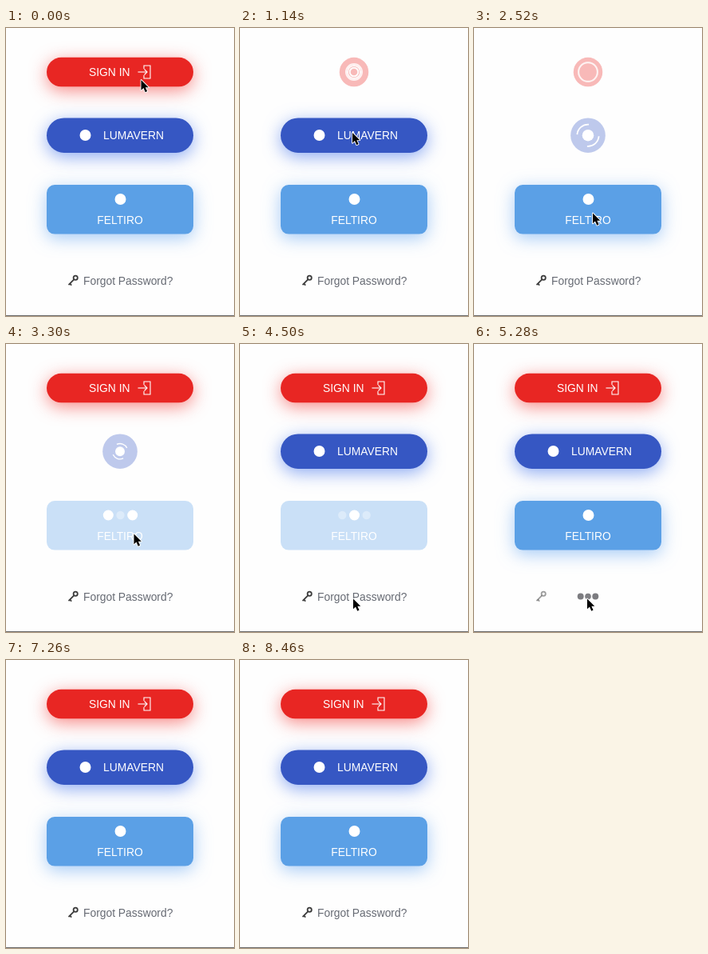
An HTML page with a canvas for the animation above (8520 ms loop, 286x360 px).

```html
<!DOCTYPE html>
<html lang="en">
<head>
<meta charset="utf-8">
<title>Loading buttons</title>
<style>
html, body { margin: 0; width: 100%; height: 100%; overflow: hidden; background: #fefefe; }
canvas { display: block; width: 286px; height: 360px; }
</style>
</head>
<body>
<canvas id="stage"></canvas>
<script>
const W = 286, H = 360, LOOP = 8520, CX = 143;
const LOAD = 2200, FADE = 300;
const FONT = '13.85px "Liberation Sans", Arial, sans-serif';

const canvas = document.getElementById('stage');
const ctx = canvas.getContext('2d');
const dpr = window.devicePixelRatio || 1;
canvas.width = W * dpr;
canvas.height = H * dpr;

const clamp = v => Math.max(0, Math.min(1, v));
const lerp = (a, b, k) => a + (b - a) * k;
const cycle = v => v - Math.floor(v);

function bezier(x1, y1, x2, y2) {
  const at = (a, b, s) => 3 * (1 - s) * (1 - s) * s * a + 3 * (1 - s) * s * s * b + s * s * s;
  return x => {
    let lo = 0, hi = 1;
    for (let i = 0; i < 20; i++) {
      const mid = (lo + hi) / 2;
      if (at(x1, x2, mid) < x) lo = mid; else hi = mid;
    }
    return at(y1, y2, (lo + hi) / 2);
  };
}
const ease = bezier(.25, .1, .25, 1);
const easeInOut = bezier(.42, 0, .58, 1);
const rippleEase = bezier(.21, .53, .56, .8);
const pulseEase = bezier(.09, .57, .49, .9);

const signIn = { y: 36.8, h: 36.5, r: 18.25, color: '#e82623', glow: 'rgba(242,50,45,.57)', click: 480, shrink: true };
const lumavern = { y: 112.4, h: 43.6, r: 21.8, color: '#3657c3', glow: 'rgba(65,115,235,.6)', click: 1790, shrink: true };
const feltiro = { y: 196, h: 61.6, r: 10, color: '#5ba0e6', glow: 'rgba(91,160,240,.55)', click: 2750 };
const forgot = { click: 4650 };

const isLoading = (b, t) => t >= b.click && t < b.click + LOAD;

// 0 = idle, 1 = fully in the loading state
function loadAmount(b, t) {
  return ease(clamp((t - b.click) / FADE)) - ease(clamp((t - b.click - LOAD) / FADE));
}

function disc(x, y, r, alpha = 1) {
  ctx.save();
  ctx.globalAlpha *= alpha;
  ctx.beginPath();
  ctx.arc(x, y, r, 0, Math.PI * 2);
  ctx.fill();
  ctx.restore();
}

function label(text, x, y, align = 'left') {
  ctx.font = FONT;
  ctx.textAlign = align;
  ctx.fillText(text, x, y);
}

function line(...pts) {
  ctx.beginPath();
  pts.forEach(([x, y], i) => i ? ctx.lineTo(x, y) : ctx.moveTo(x, y));
  ctx.stroke();
}

function buttonBase(b, t) {
  const k = loadAmount(b, t);
  const w = b.shrink ? lerp(184, b.h, k) : 184;
  const x = CX - w / 2;
  const box = dx => {
    ctx.beginPath();
    ctx.roundRect(x + dx, b.y, w, b.h, b.r);
    ctx.fill();
  };
  // only the glow of this off-stage copy is visible
  ctx.save();
  ctx.globalAlpha = 1 - k;
  ctx.shadowColor = b.glow;
  ctx.shadowBlur = 21 * dpr;
  ctx.shadowOffsetX = 1000 * dpr;
  ctx.shadowOffsetY = 5 * dpr;
  ctx.fillStyle = '#000';
  box(-1000);
  ctx.restore();

  ctx.save();
  ctx.globalAlpha = lerp(1, .32, k);
  ctx.fillStyle = b.color;
  box(0);
  ctx.restore();
  ctx.fillStyle = ctx.strokeStyle = '#fff';
}

function ripple(y, t) {
  ctx.save();
  ctx.lineWidth = 2;
  for (const shift of [0, .16, .32]) {
    const p = cycle((t - 1140) / 900 + .14 + shift);
    ctx.globalAlpha = p < .7 ? lerp(1, .7, p / .7) : lerp(.7, 0, (p - .7) / .3);
    ctx.beginPath();
    ctx.arc(CX, y, 12 * lerp(.1, 1, rippleEase(clamp(p / .7))), 0, Math.PI * 2);
    ctx.stroke();
  }
  ctx.restore();
}

function clipPulse(y, t) {
  const p = cycle((t - lumavern.click) / 1000);
  const dot = p < .3 ? lerp(1, .3, pulseEase(p / .3)) : lerp(.3, 1, pulseEase((p - .3) / .7));
  disc(CX, y, 8 * dot);
  const half = p < .5 ? 0 : 1;
  const q = pulseEase(p * 2 - half);
  const size = half ? lerp(.6, 1, q) : lerp(1, .6, q);
  ctx.save();
  ctx.translate(CX, y);
  ctx.rotate((half + q) * Math.PI);
  ctx.scale(size, size);
  ctx.lineWidth = 2;
  for (const mid of [-Math.PI / 2, Math.PI / 2]) {
    ctx.beginPath();
    ctx.arc(0, 0, 15, mid - Math.PI / 4, mid + Math.PI / 4);
    ctx.stroke();
  }
  ctx.restore();
}

function threeDots(x, y, gap, small, big, dim, phase) {
  const wave = Math.abs(1 - 2 * cycle(phase));
  for (const i of [-1, 0, 1]) {
    const k = i ? wave : 1 - wave;
    disc(x + i * gap, y, lerp(small, big, k), lerp(dim, 1, k));
  }
}

function drawSignIn(t) {
  buttonBase(signIn, t);
  if (isLoading(signIn, t)) return ripple(55, t);
  label('SIGN IN', 104, 60);
  ctx.lineWidth = 1.1;
  line([173, 51], [173, 47], [181, 47], [181, 63], [173, 63], [173, 59]);
  line([165.5, 55], [177, 55]);
  line([173.5, 51.5], [177, 55], [173.5, 58.5]);
}

function drawLumavern(t) {
  buttonBase(lumavern, t);
  if (isLoading(lumavern, t)) return clipPulse(134.2, t);
  disc(99.5, 134, 7);
  label('LUMAVERN', 122, 139);
}

function drawFeltiro(t) {
  buttonBase(feltiro, t);
  if (isLoading(feltiro, t)) threeDots(143.5, 214, 15.2, 5.2, 6.5, .35, (t - 3300) / 800);
  else disc(143.5, 214, 7);
  label('FELTIRO', CX, 245, 'center');
}

function drawForgot(t) {
  ctx.save();
  ctx.globalAlpha = lerp(1, .5, loadAmount(forgot, t));
  ctx.strokeStyle = '#3c3c3c';
  ctx.lineWidth = 1.8;
  ctx.beginPath();
  ctx.arc(87.2, 312.3, 2.6, 0, Math.PI * 2);
  ctx.stroke();
  line([85.2, 314.4], [78.5, 321.2]);
  line([80, 319.4], [82.2, 321.6]);
  ctx.restore();
  if (isLoading(forgot, t)) {
    ctx.fillStyle = '#77777b';
    threeDots(143, 315.5, 9.3, 3.5, 4.3, .9, (t - 6120) / 800 + .25);
  } else {
    ctx.fillStyle = '#666a73';
    label('Forgot Password?', 97, 320.6);
  }
}

// time, x, y of the pointer tip
const route = [
  [0, 169.5, 65], [560, 169.5, 65], [1080, 141, 131], [1850, 141, 131],
  [2450, 149, 231.5], [2800, 149, 231.5], [3200, 160.5, 237.5], [3750, 160.5, 237.5],
  [4400, 142, 318.5], [5300, 142, 318.5], [6120, 271, 339], [6300, 292, 362]
];

function drawPointer(t) {
  const i = route.findIndex(p => p[0] > t);
  if (i < 1) return;
  const [t0, x0, y0] = route[i - 1], [t1, x1, y1] = route[i];
  const k = easeInOut((t - t0) / (t1 - t0));
  ctx.save();
  ctx.translate(lerp(x0, x1, k), lerp(y0, y1, k));
  ctx.scale(.88, .88);
  ctx.beginPath();
  [[0, 0], [0, 14.5], [3.4, 11.4], [6, 17.2], [8.6, 16], [6.1, 10.4], [10.6, 10.4]]
    .forEach(([x, y]) => ctx.lineTo(x, y));
  ctx.closePath();
  ctx.lineJoin = 'round';
  ctx.lineWidth = 2;
  ctx.strokeStyle = '#fff';
  ctx.stroke();
  ctx.fillStyle = '#000';
  ctx.fill();
  ctx.restore();
}

function draw(t) {
  ctx.setTransform(dpr, 0, 0, dpr, 0, 0);
  ctx.fillStyle = '#fefefe';
  ctx.fillRect(0, 0, W, H);
  drawSignIn(t);
  drawLumavern(t);
  drawFeltiro(t);
  drawForgot(t);
  ctx.fillStyle = '#6b6b6b';
  ctx.fillRect(0, 359, W, 1);
  drawPointer(t);
}

const start = performance.now();
function tick() {
  draw((performance.now() - start) % LOOP);
  requestAnimationFrame(tick);
}
tick();
</script>
</body>
</html>
```
